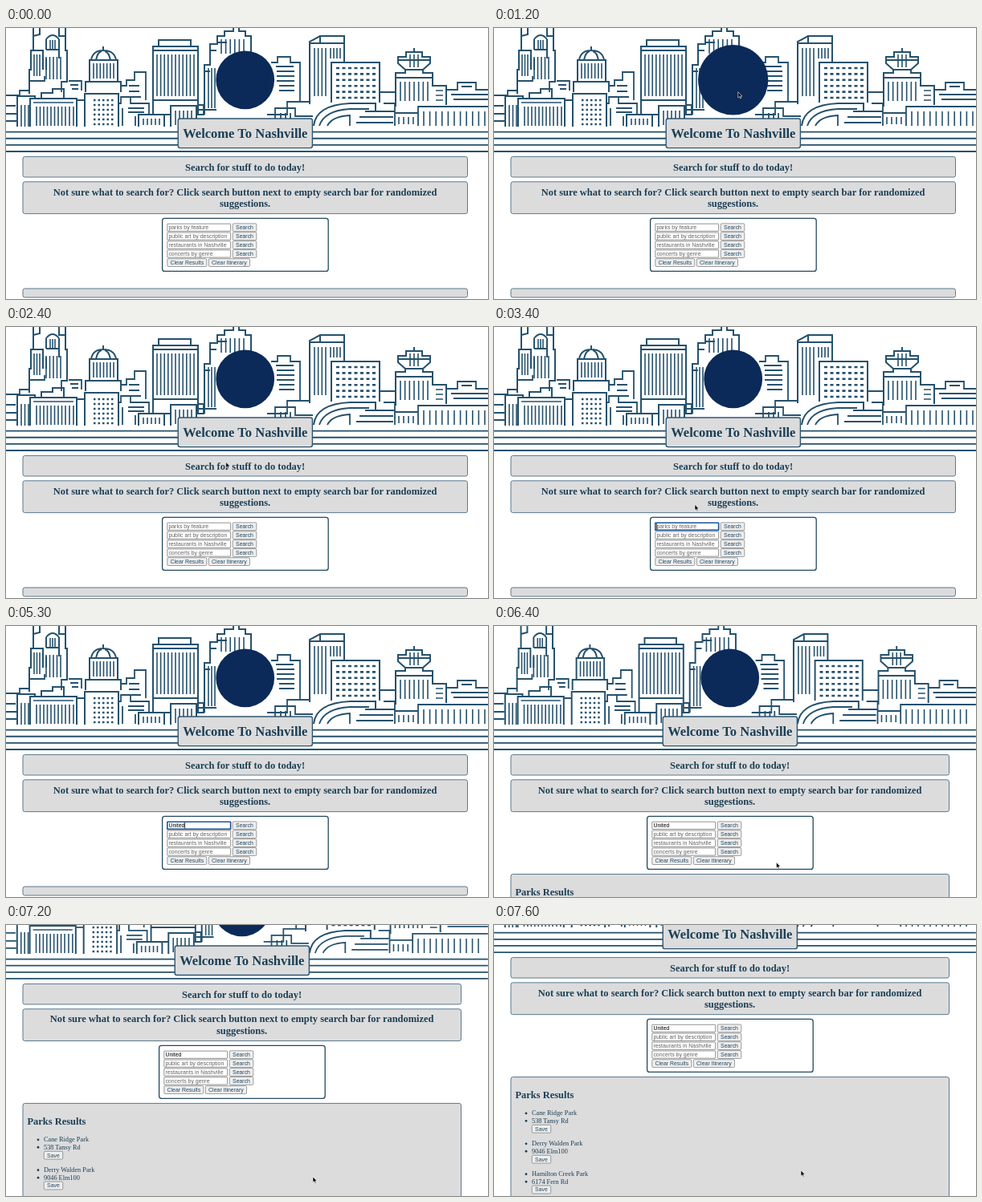
An HTML page that plays this animation: 600x338 px, repeating every 7700 ms.

```html
<!DOCTYPE html>
<html lang="en">
<head>
<meta charset="utf-8">
<title>Welcome To Nashville</title>
<style>
html, body { margin: 0; width: 100%; height: 100%; overflow: hidden; background: #fff; }
svg { display: block; width: 600px; height: 338px; }
.skyline { fill: none; stroke: #25516d; }
.solid { fill: #fff; }
.panel { fill: #dcdcdd; stroke: #4b6d83; stroke-width: .9; }
.plate { stroke: #2f5670; stroke-width: 1.4; }
.form { fill: #fff; stroke: #23495f; stroke-width: 1.3; }
.heading { font: bold 12.45px "Liberation Serif", serif; fill: #1c3f55; }
.title { font-size: 16.55px; }
.item { font: 8.27px "Liberation Serif", serif; fill: #1c3f55; }
.field { font: 6.95px "Liberation Sans", sans-serif; fill: #626262; }
.label { fill: #1f4763; }
.middle { text-anchor: middle; }
.input { fill: #fff; stroke: #767676; stroke-width: .8; }
.button { fill: #efefef; stroke: #767676; stroke-width: .7; }
</style>
</head>
<body>
<svg id="stage" viewBox="0 0 600 338"></svg>
<script>
const LOOP = 7700, STEP = 100;
const FOCUS = 3200, TYPING = 4400, KEY_TIME = 150, SUBMIT = 5800, RESULTS = 5900, SCROLL = 7000;
const QUERY = 'United';

const rect = (cls, x, y, w, h, r = 0, extra = '') =>
  `<rect class="${cls}" x="${x}" y="${y}" width="${w}" height="${h}" rx="${r}" ${extra}/>`;
const text = (cls, x, y, s, extra = '') => `<text class="${cls}" x="${x}" y="${y}" ${extra}>${s}</text>`;
const path = (d, w = 2, cls = '') => `<path class="${cls}" d="${d}" stroke-width="${w}"/>`;

// n evenly spaced strokes filling a box
function bars(x, y, w, h, n, upright = true, weight = 1.6) {
  let d = '';
  for (let i = 0; i < n; i++) {
    const k = n > 1 ? i / (n - 1) : 0;
    d += upright ? `M${x + w * k} ${y}v${h}` : `M${x} ${y + h * k}h${w}`;
  }
  return path(d, weight);
}
const block = (x, y, w, h) => path(`M${x} ${y + h}V${y}h${w}v${h}`, 2, 'solid');

// window grid made of dashed rows
const windows = (x, y, w, h, rows, dash) =>
  `<g stroke-dasharray="${dash}">${bars(x, y, w, h, rows, false, 2.6)}</g>`;

function skyline() {
  return [
    // twin-spired tower
    path('M29 82V52H31V28H34V0M34 10L42 8V0M31 28H46V52M50 14V27M50 14Q58 4 66 14M66 0V10H74V28H76V67H69M74 28V0M50 27H66V14M66 27V38M50 38V52'),
    bars(35, 33, 7, 27, 3), bars(55, 15, 6, 13, 3), bars(50, 36, 18, 28, 5),
    path('M29 66H48V60M69 66V80M78 66H94V78M80 71H90M82 76H90', 1.8),
    // low blocks on the left
    path('M0 97H12M0 84H17V78H29M0 107H13M0 116H13', 1.8),
    block(14, 85, 22, 38), bars(19, 96, 9, 27, 3), path('M44 88V81H58V76H72V88'),
    block(30, 88, 58, 35), path('M34 93H84', 1.6), bars(38, 98, 36, 24, 9), bars(79, 98, 5, 24, 2),
    // domed building
    path('M104 66V40H139V66M106 40Q108 28 121 28Q135 28 137 40M121 23V28M112 40Q114 30 119 29M130 40Q128 30 123 29M99 80V67H143V80'),
    bars(109, 44, 25, 19, 7),
    path('M88 90H99M143 72H150V65H160V55H174V90M153 72H166M153 79H166M153 86H168', 1.8),
    block(98, 82, 42, 41), windows(109, 90, 27, 30, 6, '2.5 3'),
    path('M140 94H143V86H155V94H178V122M145 100V122M161 110V122M152 100H172M152 105H172', 1.8),
    // tall striped tower
    block(183, 23, 56, 85), path('M190 23V15H230V23M183 28H239'),
    bars(188, 33, 46, 52, 11), path('M183 90H239M170 108H246V96H239'),
    block(165, 108, 32, 15), bars(171, 113, 20, 8, 5), block(205, 97, 32, 26), bars(211, 103, 20, 18, 5),
    // stepped building with a spire
    path('M247 108V46H254V20H263V10H272V4H283V0M290 0V4H298V10H305V35M254 28H262M247 54H254M263 18H275'),
    bars(268, 14, 28, 18, 6), bars(252, 50, 8, 50, 3), path('M240 102H262'),
    // centre right
    path('M330 43H338V36H354V43H366V92M336 48H358M337 54H359M337 60H359M337 66H359M340 72H359M340 78H359M325 108H350V92H378', 1.8),
    path('M378 95V17L391 10H421V43M378 19H421M391 10V19'),
    bars(384, 25, 14, 60, 4), bars(404, 25, 12, 13, 4),
    block(405, 43, 60, 50), windows(411, 50, 50, 37, 6, '4 3.5'),
    path('M335 122V100H360V110H382M342 106V122M348 106V122M354 106V122M364 116H380', 1.8),
    // arched hall
    path('M383 122Q386 96 428 94H460V104', 2, 'solid'),
    path('M390 122Q396 103 428 101H452M400 122Q406 110 428 109V122', 1.8),
    path('M447 104H484V94H470M440 111H482M436 118H482M465 80H485', 1.8),
    // tower with an octagonal crown
    path('M497 52L488 44V36H498V30H518V36H528V44L519 52ZM508 25V30M488 40H528M485 98V56H497V52M519 52V56H531V72H548V96M485 62H531'),
    bars(503, 33, 10, 16, 3), bars(491, 67, 34, 24, 7), path('M535 78H544M535 84H544M535 90H544', 1.6),
    // right edge
    path('M548 77H562V68H585V77H608M567 73H580M554 83H608M557 89H608M513 122V98H608M484 122V106H513', 1.8),
    bars(520, 104, 76, 18, 11), bars(489, 111, 18, 9, 4),
    // river lines
    bars(0, 129.6, 608, 24.4, 4, false, 1.8)
  ].join('');
}

function form() {
  const hints = ['parks by feature', 'public art by description', 'restaurants in Nashville', 'concerts by genre'];
  const button = (x, y, w, s) =>
    rect('button', x, y - 4.9, w, 9.8, 1.2) + text('field label middle', x + w / 2, y + 2.4, s);
  const rows = hints.map((hint, i) => {
    const y = 248.8 + i * 10.9;
    return rect('input', 200.8, y - 4.6, 78.8, 9.2, .5, `id="input${i}"`) +
      text('field', 202.4, y + 2.4, hint, `id="hint${i}"`) + button(282.2, y, 29.6, 'Search');
  }).join('');
  return rect('form', 194.6, 237.4, 206.6, 66, 3) + rows +
    button(200.8, 292.6, 49, 'Clear Results') + button(252.3, 292.6, 51.2, 'Clear Itinerary') +
    '<path id="caret" stroke="#000" stroke-width=".7"/>';
}

function results() {
  const parks = [['Cane Ridge Park', '538 Tansy Rd'], ['Derry Walden Park', '9046 Elm100'],
    ['Hamilton Creek Park', '6174 Fern Rd'], ['Maple Bend Park', '850 Alder Rd']];
  return rect('panel', 21, 309.5, 545.5, 300, 2.5) + text('heading', 26.5, 336, 'Parks Results') +
    parks.map((lines, i) => {
      const y = 357.3 + i * 37.9;
      return lines.map((s, j) => `<circle cx="40" cy="${y + j * 9.4 - 2.4}" r="1.4" fill="#1c3f55"/>` +
        text('item', 47, y + j * 9.4, s)).join('') +
        rect('button', 47.3, y + 12, 23.4, 9.8, 1.2) + text('field label middle', 59, y + 19.3, 'Save');
    }).join('');
}

const stage = document.getElementById('stage');
stage.innerHTML = `<g id="page">
  <g id="skyline" class="skyline">${skyline()}</g>
  ${rect('panel wide', 21, 160.5, 553.5, 25.5, 2.5)}
  ${rect('panel wide', 21, 191.8, 553.5, 39.8, 2.5)}
  ${rect('panel', 21, 325, 553.5, 11, 2.5, 'id="empty"')}
  <g id="centre">
    <circle id="emblem" cx="297.7" cy="64.8" fill="#0b2a59"/>
    ${rect('panel plate', 214.2, 113, 167.2, 36.6, 2.5)}
    ${text('heading title middle', 297.8, 136.6, 'Welcome To Nashville')}
    ${text('heading middle', 297.6, 177.6, 'Search for stuff to do today!')}
    ${text('heading middle', 297.6, 208.5, 'Not sure what to search for? Click search button next to empty search bar for randomized')}
    ${text('heading middle', 297.6, 223, 'suggestions.')}
    ${form()}
  </g>
  <g id="results">${results()}</g>
</g>
<path id="cursor" d="M0 0V7.2L1.7 5.7L2.8 8.2L4 7.7L2.9 5.3H5.1Z" fill="#000" stroke="#fff" stroke-width=".6"/>`;

const el = id => document.getElementById(id);
const show = (id, on) => el(id).setAttribute('visibility', on ? 'visible' : 'hidden');
const move = (id, x, y) => el(id).setAttribute('transform', `translate(${x} ${y})`);
const ease = (t, a, b) => {
  const k = Math.min(1, Math.max(0, (t - a) / (b - a)));
  return k * k * (3 - 2 * k);
};

// time, x, y
const cursorPath = [[100, 400, 285], [700, 312, 90], [1500, 300, 75], [1900, 301, 108], [3000, 238, 248],
  [3200, 240, 247], [3400, 250, 221.5], [5400, 250, 222], [5700, 293, 248], [5900, 294, 249],
  [6700, 378, 316], [7000, 379.5, 316.5], [7200, 382, 314], [7600, 382, 306]];

function cursorAt(t) {
  const i = Math.max(1, cursorPath.findIndex(p => p[0] >= t));
  const a = cursorPath[i - 1], b = cursorPath[i], k = ease(t, a[0], b[0]);
  return [a[1] + (b[1] - a[1]) * k, a[2] + (b[2] - a[2]) * k];
}

function draw(t) {
  const listed = t >= RESULTS, focused = t >= FOCUS && t < SUBMIT;
  const scrolled = t > SCROLL ? 123 * (1 - Math.exp(-.00615 * (t - SCROLL))) : 0;
  move('page', 0, -scrolled);
  move('centre', listed ? -4 : 0, 0);
  el('skyline').setAttribute('transform', `scale(${listed ? 592 / 600 : 1} 1)`);
  document.querySelectorAll('.wide').forEach(p => p.setAttribute('width', listed ? 545.5 : 553.5));
  show('empty', !listed);
  show('results', listed);

  const hover = ease(t, 500, 900) - ease(t, 1850, 2400);
  el('emblem').setAttribute('r', 36.4 * (1 + .2 * hover));

  const typed = QUERY.slice(0, Math.max(0, Math.floor((t - TYPING) / KEY_TIME) + 1));
  const hint = el('hint0');
  hint.textContent = typed || 'parks by feature';
  hint.style.fill = typed ? '#000' : '';
  el('input0').style.stroke = focused ? '#1b5795' : '';
  el('input0').style.strokeWidth = focused ? 1.6 : '';
  const caretX = 202.6 + (typed ? hint.getComputedTextLength() : 0);
  el('caret').setAttribute('d', `M${caretX} 245v7.6`);
  show('caret', focused && (t >= TYPING || (t - FOCUS) % 1000 < 500));

  show('cursor', (t >= 100 && t < 3900) || t >= 5400);
  move('cursor', ...cursorAt(t));
}

function frame(now) {
  draw(Math.floor(now % LOOP / STEP) * STEP);
  requestAnimationFrame(frame);
}
draw(0);
requestAnimationFrame(frame);
</script>
</body>
</html>
```
